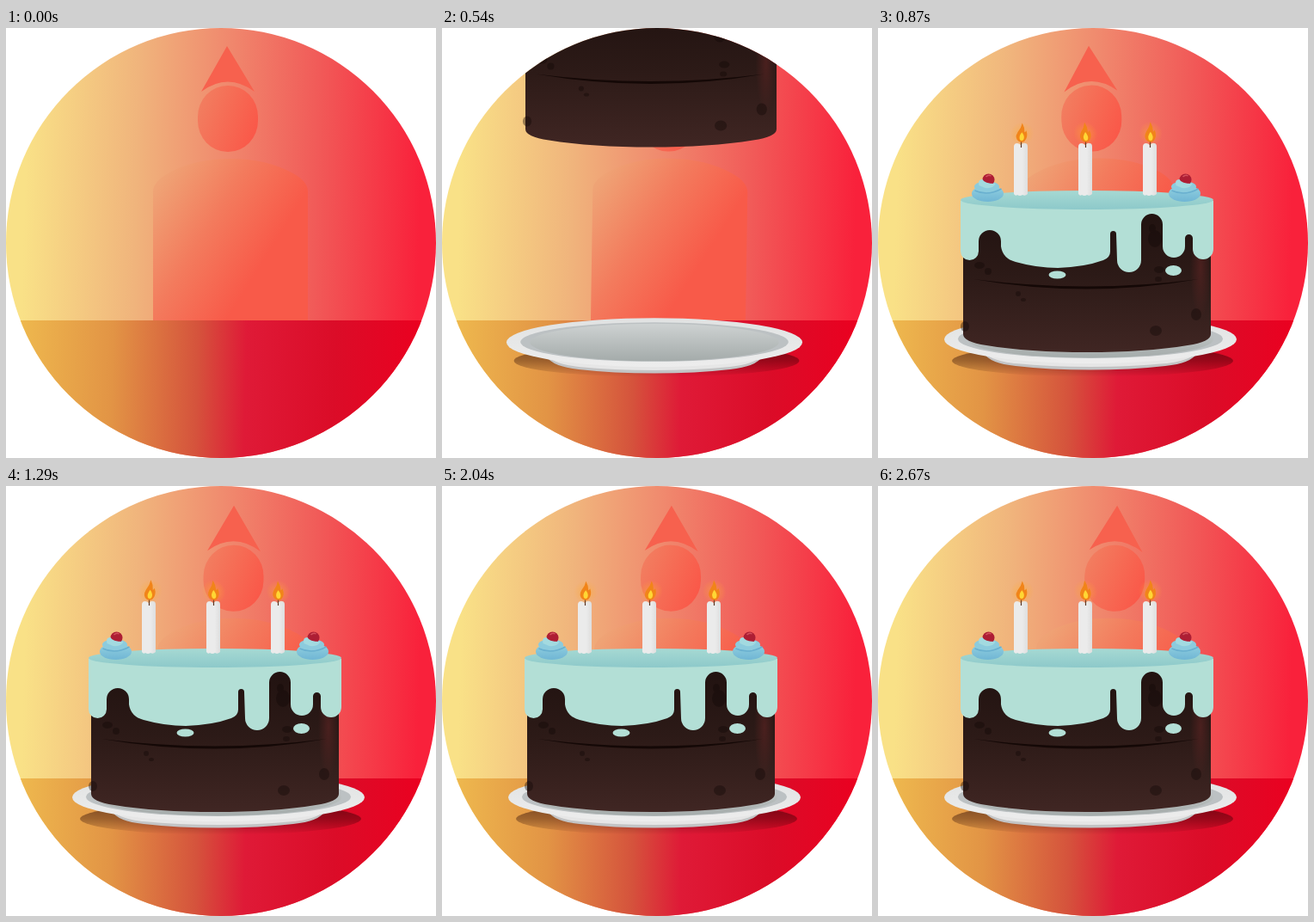
An HTML page that plays this animation: 500x500 px, repeating every 2.7 s.

```html
<!DOCTYPE html>
<html lang="en">
<head>
<meta charset="utf-8">
<title>Birthday cake</title>
<style>
html, body { margin: 0; width: 100%; height: 100%; overflow: hidden; background: #fff; }
svg { display: block; width: 100vw; height: 100vh; }
</style>
</head>
<body>
<svg viewBox="0 0 500 500">
  <defs>
    <clipPath id="disc"><circle cx="250" cy="250" r="250"/></clipPath>
    <linearGradient id="wall" gradientUnits="userSpaceOnUse" x1="0" y1="244" x2="500" y2="256">
      <stop offset=".04" stop-color="#f9e187"/>
      <stop offset=".3" stop-color="#f0b47c"/>
      <stop offset=".5" stop-color="#f08a6e"/>
      <stop offset=".72" stop-color="#f15a58"/>
      <stop offset=".96" stop-color="#f9213b"/>
    </linearGradient>
    <linearGradient id="table" gradientUnits="userSpaceOnUse" x1="15" y1="414" x2="485" y2="426">
      <stop offset="0" stop-color="#eeb84e"/>
      <stop offset=".23" stop-color="#e29445"/>
      <stop offset=".44" stop-color="#d5533c"/>
      <stop offset=".56" stop-color="#df1a37"/>
      <stop offset=".78" stop-color="#db0c28"/>
      <stop offset="1" stop-color="#eb0020"/>
    </linearGradient>
    <linearGradient id="torso" gradientUnits="userSpaceOnUse" x1="172" y1="190" x2="300" y2="270">
      <stop offset="0" stop-color="#efa375"/>
      <stop offset=".5" stop-color="#f37b5d"/>
      <stop offset="1" stop-color="#f85a49"/>
    </linearGradient>
    <linearGradient id="face" x1="0" y1=".3" x2="1" y2=".7">
      <stop offset="0" stop-color="#f27e60"/>
      <stop offset="1" stop-color="#fa5748"/>
    </linearGradient>
    <linearGradient id="shade" x1="0" y1="0" x2="0" y2="1">
      <stop offset="0" stop-color="#200" stop-opacity=".55"/>
      <stop offset=".5" stop-color="#200" stop-opacity=".36"/>
      <stop offset="1" stop-color="#200" stop-opacity="0"/>
    </linearGradient>
    <linearGradient id="rim" x1="0" y1="0" x2="0" y2="1">
      <stop offset="0" stop-color="#e0e2e2"/>
      <stop offset="1" stop-color="#ededed"/>
    </linearGradient>
    <linearGradient id="bowl" x1="0" y1="0" x2="0" y2="1">
      <stop offset="0" stop-color="#ced2d2"/>
      <stop offset="1" stop-color="#a4abaa"/>
    </linearGradient>
    <linearGradient id="sponge" x1="0" y1="0" x2="0" y2="1">
      <stop offset="0" stop-color="#1f110f"/>
      <stop offset=".5" stop-color="#2c1a17"/>
      <stop offset="1" stop-color="#402623"/>
    </linearGradient>
    <linearGradient id="icing" x1="0" y1="0" x2="0" y2="1">
      <stop offset="0" stop-color="#a6d9d3"/>
      <stop offset="1" stop-color="#8dc9ca"/>
    </linearGradient>
    <linearGradient id="cream" x1="0" y1="0" x2="0" y2="1">
      <stop offset="0" stop-color="#93d1df"/>
      <stop offset="1" stop-color="#70b6d5"/>
    </linearGradient>
    <linearGradient id="wax">
      <stop offset=".6" stop-color="#ebebeb"/>
      <stop offset="1" stop-color="#dedede"/>
    </linearGradient>
    <radialGradient id="glow">
      <stop offset="0" stop-color="#ffae30" stop-opacity=".5"/>
      <stop offset="1" stop-color="#ffae30" stop-opacity="0"/>
    </radialGradient>
    <radialGradient id="blush">
      <stop offset="0" stop-color="#7a2a2a" stop-opacity=".4"/>
      <stop offset="1" stop-color="#7a2a2a" stop-opacity="0"/>
    </radialGradient>
  </defs>

  <g clip-path="url(#disc)">
    <rect width="500" height="500" fill="url(#wall)"/>
    <g id="guest">
      <path fill="url(#torso)" d="M171 420V190Q171 179 190 168Q220 152 261 152Q302 152 332 168Q351 178 351 190V420Z"/>
      <rect x="223" y="67" width="70" height="77" rx="34.5" ry="36" fill="url(#face)"/>
      <path fill="#f7614e" d="M257 21L289 74Q258 51 227 74Z"/>
    </g>
    <rect y="340" width="500" height="160" fill="url(#table)"/>

    <ellipse id="shadow" cx="249.5" cy="387" rx="163.5" ry="18.5" fill="url(#shade)"/>
    <g id="plate">
      <path fill="#c3c4c5" d="M123 378Q130 390 160 393Q200 397.500 247 397.500Q294 397.500 334 393Q364 390 371 378Z"/>
      <path fill="#e6e6e6" d="M125 378Q132 387 160 390Q200 394 247 394Q294 394 334 390Q362 387 369 378Z"/>
      <ellipse cx="247" cy="362" rx="170" ry="28" fill="url(#rim)"/>
      <ellipse cx="247" cy="361.500" rx="154" ry="22.500" fill="#bcc1c3"/>
      <ellipse cx="247" cy="362" rx="143" ry="21.500" fill="url(#bowl)"/>
    </g>

    <g id="cake">
      <path fill="url(#sponge)" d="M99 201H387V358Q387 367 360 371Q310 379 243 379Q176 379 126 371Q99 367 99 358Z"/>
      <ellipse cx="375" cy="280" rx="12" ry="60" fill="url(#blush)"/>
      <path fill="#140806" d="M111 294Q243 311 373 294Q243 317 111 294Z"/>
      <g id="crumbs" fill="#120807" opacity=".4"/>
    </g>

    <g id="frosting">
      <path fill="#b3dfd6" d="M96 201V259.500A10.500 10.500 0 0 0 117 259.500V248A13 13 0 0 1 143 248V254Q145 268 160 272Q185 279 209 279Q240 278 262 270Q270 267 270 260V239.500A3.500 3.500 0 0 1 277 239.500L278 270A14 14 0 0 0 306 270V228.500A12.500 12.500 0 0 1 331 228.500V254A13 13 0 0 0 357 254V244.500A4.500 4.500 0 0 1 366 244.500V257A12 12 0 0 0 390 257V201Z"/>
      <ellipse cx="208.500" cy="287" rx="10" ry="4.500" fill="#b3dfd6"/>
      <ellipse cx="343.500" cy="282" rx="9.500" ry="6" fill="#b3dfd6"/>
      <ellipse cx="243" cy="200" rx="147" ry="11" fill="url(#icing)"/>
    </g>
    <g id="toppings"></g>
    <g id="candles"></g>
  </g>
</svg>
<script>
const LOOP = 2700, STEP = 30;
const $ = id => document.getElementById(id);

// Eased interpolation through [time, value] pairs.
function track(keys, t) {
  if (t <= keys[0][0]) return keys[0][1];
  for (let i = 1; i < keys.length; i++) {
    const [a, u] = keys[i - 1], [b, v] = keys[i];
    if (t <= b) return u + (v - u) * (1 - Math.cos(Math.PI * (t - a) / (b - a))) / 2;
  }
  return keys[keys.length - 1][1];
}

const clamp = x => Math.max(0, Math.min(1, x));
const move = (id, value) => $(id).setAttribute('transform', value);
const show = (id, on) => $(id).setAttribute('visibility', on ? 'visible' : 'hidden');
const scaleAt = (x, y, sx, sy) => `translate(${x} ${y}) scale(${sx} ${sy}) translate(${-x} ${-y})`;

const sway = [[0, 0], [330, 2.05], [870, -1.53], [1230, 1.15], [1590, -0.7], [1950, 1.6], [2310, -0.7], [2670, 2.7]];
const bob = [[0, 0], [870, -0.6], [1110, 1.8], [2670, 1.5]];
const plateSize = [[30, 0], [330, 0.976], [420, 1.04], [540, 1.012], [660, 1]];
const shadowSize = [[30, 0], [300, 1], [540, 1.015], [660, 1]];
const settle = [[600, 0], [660, 4], [760, -4], [870, -2], [990, 0]];

const crumbs = [[322, 247, 8, 10], [319, 235, 4, 5], [327, 283, 6, 4], [326, 294, 4, 3], [118, 278, 6, 4],
  [128, 285, 4, 4], [163, 311, 3, 3], [169, 318, 3, 2], [323, 354, 7, 6], [370, 335, 6, 7], [101, 349, 5, 6]];
$('crumbs').innerHTML = crumbs.map(([x, y, rx, ry]) =>
  `<ellipse cx="${x}" cy="${y}" rx="${rx}" ry="${ry}"/>`).join('');

const rosette = (x, flip) => `<g transform="translate(${x} 0) scale(${flip} 1)">
  <ellipse cy="192.500" rx="18.500" ry="9.500" fill="url(#cream)"/>
  <ellipse cx="-1" cy="184.500" rx="14.500" ry="6.500" fill="#8ccbdd"/>
  <path d="M-15 189Q0 196 16 187" fill="none" stroke="#69b0d0" stroke-width="1.500"/>
  <circle cx="1" cy="176.500" r="7" fill="#ae1e34"/>
  <path d="M-2 173Q1 170 4 172" fill="none" stroke="#d4505c" stroke-width="1.500"/>
  <path d="M-10 183Q-12 176 -6 176Q-4 181 9 181Q7 187 -3 186Z" fill="#a3dae0"/></g>`;
$('toppings').innerHTML = rosette(127.5, 1) + rosette(356.5, 1);

const candle = x => `<g transform="translate(${x} 0)">
  <path d="M-8 193V138Q-8 134 -4 134Q-2 134 0 136Q3 133 5 134Q8 134 8 138V193Q5 196 2 194Q-1 196 -4 194Q-6 196 -8 193Z" fill="url(#wax)"/>
  <path d="M.500 139V130" stroke="#5a3423" stroke-width="1.200"/>
  <g class="flame"><circle cx="1" cy="123" r="14" fill="url(#glow)"/>
  <path d="M1 110Q0 116 -4 121Q-8 128 -2 132Q1 133.500 4 132Q9 127 6 119Q5 121 4 121Q4 115 1 110Z" fill="#f18419"/>
  <path d="M1 121Q-3 126 -1 130Q1 132 3 130Q5 126 1 121Z" fill="#ffd634"/></g></g>`;
$('candles').innerHTML = [166, 241, 316].map(candle).join('');
const flames = [...document.querySelectorAll('.flame')];

function draw(t) {
  move('guest', `translate(0 ${track(bob, t)}) rotate(${track(sway, t)} 261 470)`);

  const p = track(plateSize, t);
  show('plate', t > 30);
  move('plate', `translate(0 ${300 * (p - 1)}) ` + scaleAt(247, 362, p, p));
  const s = track(shadowSize, t);
  show('shadow', t > 30);
  move('shadow', scaleAt(249.5, 387, s, s));

  const fall = clamp((t - 450) / 150);
  const drop = -400 * (1 - Math.pow(fall, 1.8));
  const wide = track([[540, 1.014], [660, 1]], t);
  show('cake', fall > 0);
  move('cake', `translate(0 ${drop + track(settle, t)}) ` + scaleAt(243, 379, wide, 1));

  show('frosting', t >= 630);
  move('frosting', scaleAt(243, 200, 1, track([[600, 0.1], [720, 1.08], [810, 1]], t)));

  show('toppings', t >= 690);
  move('toppings', `translate(0 ${track([[660, -90], [780, 3], [840, 0]], t)})`);
  show('candles', t >= 690);
  move('candles', scaleAt(241, 195, 1, track([[660, 0], [780, 1.06], [840, 1]], t)));

  const lit = clamp((t - 750) / 90);
  flames.forEach((flame, i) => {
    const lean = 5 * Math.sin(2 * Math.PI * t / 450 + i * 1.7);
    const tall = lit * (1 + 0.03 * Math.sin(2 * Math.PI * t / 300 + i));
    flame.setAttribute('transform', `translate(1 132) skewX(${lean}) scale(${lit} ${tall}) translate(-1 -132)`);
  });
}

const start = performance.now();
function tick() {
  const t = (performance.now() - start) % LOOP;
  draw(Math.floor(t / STEP) * STEP);
  requestAnimationFrame(tick);
}
tick();
</script>
</body>
</html>
```
